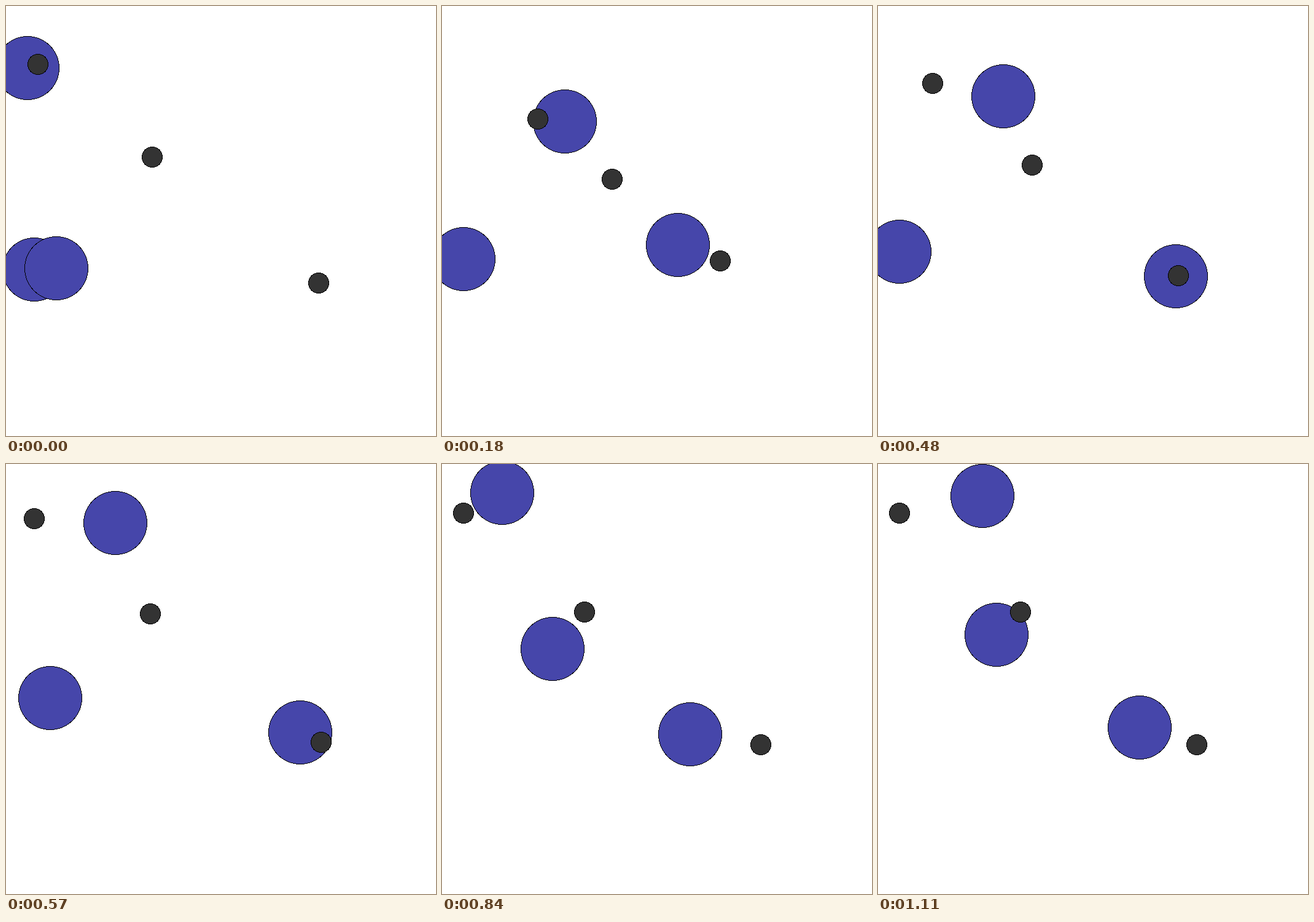
An HTML page with a canvas that plays this animation: 700 px wide and 700 px high, repeating every 1.17 s.

```html
<!DOCTYPE html>
<html lang="en">
<head>
<meta charset="utf-8">
<title>Drifting circles</title>
<style>
  html, body { margin: 0; width: 100%; height: 100%; overflow: hidden; background: #fff; }
  canvas { display: block; }
</style>
</head>
<body>
<canvas id="stage" width="700" height="700"></canvas>
<script>
const ctx = document.getElementById("stage").getContext("2d");
const LOOP = 1170, TICK = 30, WALL = 35;

// Each large circle glides through a few points, all reached at the same steps
const steps = [1, 4, 8, 11, 15, 19, 25];
const paths = [
  [[35, 101], [200, 188], [251, 212], [204, 147], [153, 61], [98, 47], [170, 52]],
  [[46, 429], [35, 412], [35, 400], [35, 400], [126, 351], [180, 301], [193, 278]],
  [[82, 427], [384, 389], [463, 382], [485, 440], [467, 434], [404, 440], [426, 429]]
];

// Small dots leave their rest point along a fixed direction
const dots = [
  { x: 35.4, y: 80.22, dx: 1, dy: 0.86 },
  { x: 232, y: 241.06, dx: 0.372, dy: 0.345 },
  { x: 519.4, y: 457.55, dx: -0.548, dy: -0.345 }
];

// Quick eased pull outwards, then a steady return to rest
function pull(k) {
  const rise = 133 - 115.8 * 0.47 ** (k - 1);
  const fall = 118.3 - 21.53 * (k - 8);
  return Math.max(0, Math.min(rise, fall));
}

// Smooth curve through the points of a path
function glide(path, axis, k) {
  const last = steps.length - 1;
  const slope = i => (path[i + 1][axis] - path[i][axis]) / (steps[i + 1] - steps[i]);
  const tangent = i => {
    if (i === 0) return 1.4 * slope(0);
    if (i === last) return 0;
    const a = slope(i - 1), b = slope(i);
    return a * b > 0 ? 2 * a * b / (a + b) : 0;
  };
  let i = 0;
  while (i < last - 1 && k >= steps[i + 1]) i++;
  const h = steps[i + 1] - steps[i];
  const u = (k - steps[i]) / h, v = 1 - u;
  return path[i][axis] * v * v * (1 + 2 * u) + path[i + 1][axis] * u * u * (3 - 2 * u)
    + h * u * v * (tangent(i) * v - tangent(i + 1) * u);
}

// Hard-edged disc, drawn row by row
function disc(x, y, r, color) {
  ctx.fillStyle = color;
  for (let row = -r; row < r; row++) {
    const w = Math.round(Math.sqrt(r * r - (row + 0.5) ** 2));
    ctx.fillRect(x - w, y + row, 2 * w, 1);
  }
}

function ball(x, y, r, color) {
  x = Math.floor(x);
  y = Math.floor(y);
  disc(x, y, r, "#000");
  disc(x, y, r - 1, color);
}

function draw(now) {
  // Steps last 45 ms, shown on a 30 ms grid
  const slot = Math.floor((now % LOOP) / TICK);
  const k = Math.max(1, Math.ceil((slot + 1) * 2 / 3) - 1);

  ctx.fillStyle = "#fff";
  ctx.fillRect(0, 0, 700, 700);
  for (const path of paths) {
    ball(Math.max(WALL, glide(path, 0, k)), glide(path, 1, k), 52, "#4646aa");
  }
  const u = pull(k);
  for (const d of dots) ball(d.x + d.dx * u, d.y + d.dy * u, 17, "#333");
  requestAnimationFrame(draw);
}

draw(0);
</script>
</body>
</html>
```
